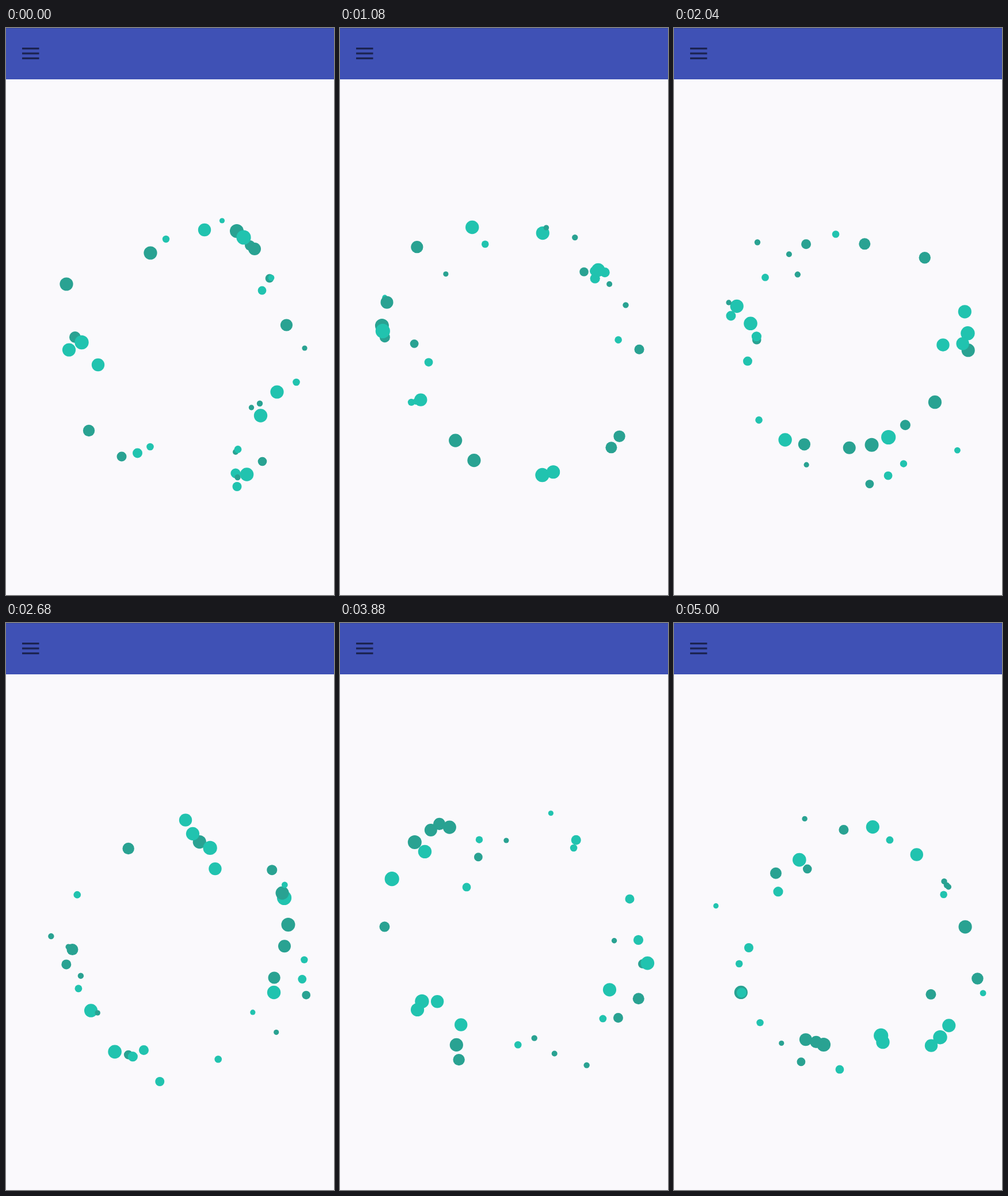
Animation of 570x983 px, one loop 5040 ms. Source, as an HTML page with a canvas:

```html
<!DOCTYPE html>
<html lang="en">
<head>
<meta charset="utf-8">
<style>
  html, body { margin: 0; height: 100%; overflow: hidden; background: #faf9fc; }
  canvas { display: block; width: 100vw; height: 100vh; }
</style>
</head>
<body>
<canvas id="stage" width="570" height="983"></canvas>
<script>
const ctx = document.getElementById('stage').getContext('2d');
const LOOP = 5040, STEP = 40;
const CENTER = { x: 308, y: 561 };
const TILT = 55 * Math.PI / 180;
const AXIS = { x: Math.cos(TILT), y: Math.sin(TILT) };
const MAX_SHIFT = 46;

// Starting x, y and size of each dot; a negative size means the darker green.
const START = [
  [345, 350, 11.2], [375.5, 334, 4.6], [401, 352, -12], [424, 377, -9],
  [432, 383, -11], [413, 363, 12.6], [278, 366, 6.2], [251, 390, -11.6],
  [105, 444, -11.6], [458, 434, -7.4], [461, 433, 5.4], [445, 455, 7.4],
  [487.5, 515, -10.6], [519, 555, -4.6], [120, 536, -10], [131.5, 545, 12.2],
  [109.5, 558, 11.6], [160, 584, 11.2], [144, 698, -10.2], [201, 743, -8.5],
  [228.5, 737, 8.5], [250.5, 726, 6.3], [504.5, 614, 6.3], [471, 631, 11.6],
  [441, 651, -5.2], [426.5, 658, -4.7], [442.5, 672, 11.7], [399, 735, -5],
  [403, 730.5, 6.4], [445.5, 751.5, -7.8], [399, 772, 8.6], [402.5, 779, -5.2],
  [418.5, 774, 11.8], [401.5, 795, 8]
];

let seed = 7;
function random(min, max) {
  seed = seed * 16807 % 2147483647;
  return min + (max - min) * seed / 2147483647;
}

// Each dot circles its own point on a tilted line through the center.
const dots = START.map(([x, y, size]) => {
  const dx = x - CENTER.x, dy = y - CENTER.y;
  const along = dx * AXIS.x + dy * AXIS.y;
  const across = dx * AXIS.y - dy * AXIS.x;
  const reach = Math.sqrt(Math.max(0, random(186, 210) ** 2 - across ** 2));
  const wanted = along - Math.sign(along) * reach;
  const shift = Math.max(-MAX_SHIFT, Math.min(MAX_SHIFT, wanted));
  const ox = dx - shift * AXIS.x, oy = dy - shift * AXIS.y;
  return {
    x: CENTER.x + shift * AXIS.x,
    y: CENTER.y + shift * AXIS.y,
    orbit: Math.hypot(ox, oy),
    angle: Math.atan2(oy, ox),
    speed: -random(1.4, 2.5),
    size: Math.abs(size),
    color: size < 0 ? '#29a292' : '#21c3af'
  };
});

function rect(color, x, y, w, h) {
  ctx.fillStyle = color;
  ctx.fillRect(x, y, w, h);
}

function draw(ms) {
  rect('#faf9fc', 0, 0, 570, 983);
  rect('#3f51b5', 0, 0, 570, 89);
  rect('#38489f', 0, 0, 570, 1);
  for (const y of [34, 42.5, 51]) rect('#1b2350', 28, y, 29.5, 3.2);
  for (const dot of dots) {
    const angle = dot.angle + dot.speed * ms / 1000;
    ctx.fillStyle = dot.color;
    ctx.beginPath();
    ctx.arc(dot.x + dot.orbit * Math.cos(angle), dot.y + dot.orbit * Math.sin(angle),
      dot.size, 0, 2 * Math.PI);
    ctx.fill();
  }
}

const begin = performance.now();
function tick() {
  const ms = Math.max(0, performance.now() - begin) % LOOP;
  draw(Math.floor(ms / STEP) * STEP);
  requestAnimationFrame(tick);
}
tick();
</script>
</body>
</html>
```
